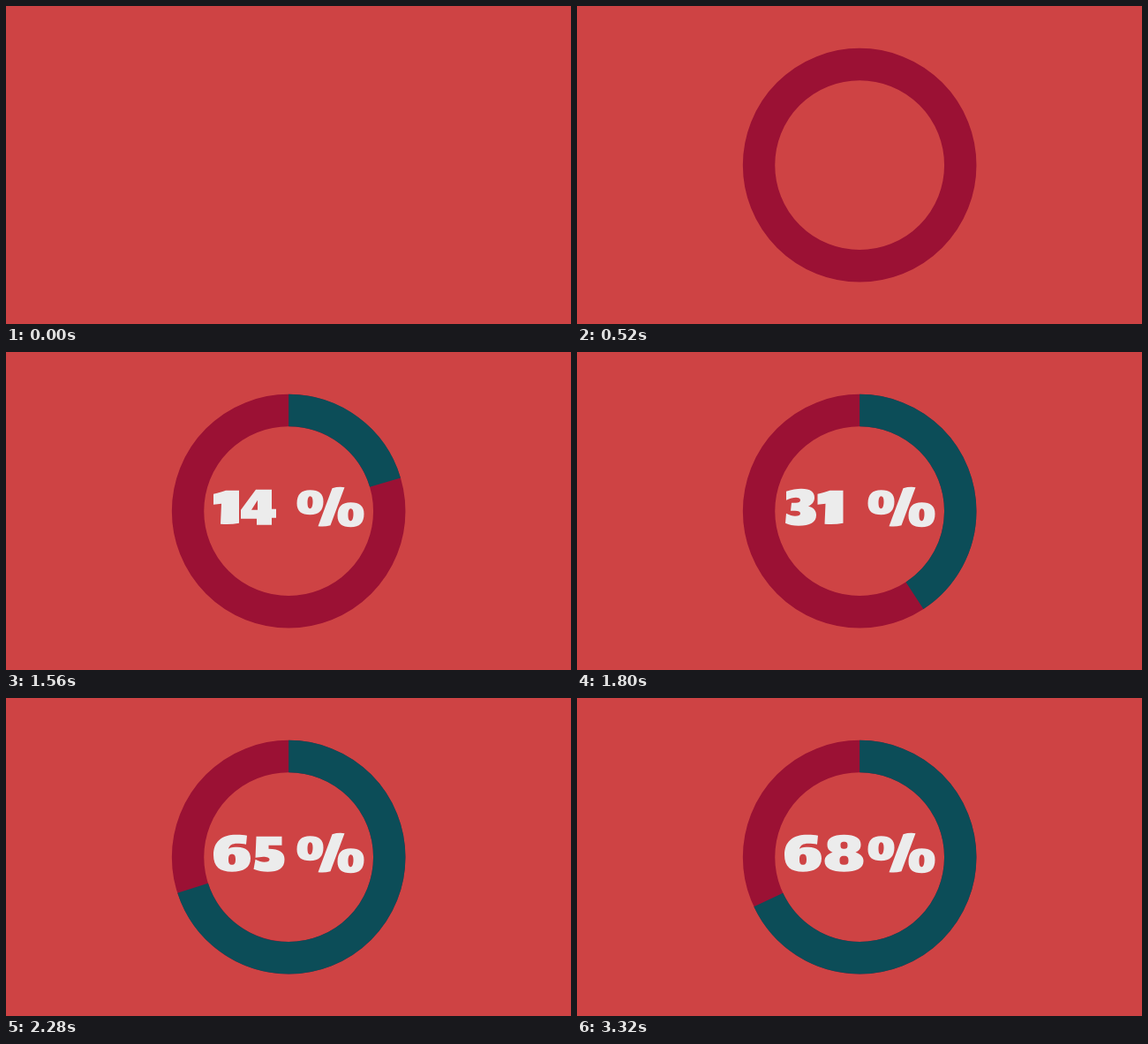
An HTML page with a canvas that plays this animation: 640x360 px, repeating every 4 s.

```html
<!DOCTYPE html>
<html lang="en">
<head>
<meta charset="utf-8">
<title>Percentage ring</title>
<style>
  html, body { margin: 0; width: 100%; height: 100%; overflow: hidden; background: #ce4344; }
  canvas { display: block; }
</style>
</head>
<body>
<canvas id="stage" width="640" height="360" role="img" aria-label="68%"></canvas>
<script>
const ctx = document.getElementById('stage').getContext('2d');

const LOOP = 4000, STEP = 40, PERCENT = 68;
const COLORS = { back: '#ce4344', track: '#9b1134', fill: '#0c4d58', text: '#ececec' };
const RING = { x: 320.15, y: 180.15, radius: 114.1, width: 36.4 };

// Chunky numerals: advance width and outline, top at y = 0
const glyph = (advance, d) => ({ advance, path: new Path2D(d) });
const GLYPHS = {
  0: glyph(43, 'M21 1C36 1 41 7 41 20C41 35 36 42 20 42C6 42 0 36 0 22C0 7 6 1 21 1Z' +
    'M22 9C18 9 16 14 16 22C16 30 17 34 20 34C24 34 26 28 26 20C26 13 25 9 22 9Z'),
  1: glyph(31, 'M0 6C6 5 10 3 14 2L29 2L29 39Q19 41 8 40L9 17L0 18Z'),
  2: glyph(39, 'M1 4C7 1 13 0 19 0C31 0 36 4 36 12C36 20 31 25 22 30L37 29L36 41L1 41L1 31C13 24 18 18 18 14C18 11 16 10 13 10C9 10 5 12 2 15Z'),
  3: glyph(37.5, 'M2 3C8 1 14 0 19 0C30 0 34 4 34 10C34 15 31 18 27 20C33 21 36 25 36 30C36 38 29 42 16 42C10 42 5 41 1 39L2 28C6 30 9 31 12 31C16 31 18 30 18 28C18 26 16 25 12 25L7 25L8 16L13 16C16 16 18 15 18 13C18 11 16 10 13 10C10 10 6 11 2 13Z'),
  4: glyph(42, 'M17 1L35 1L35 23L40 23L40 33L35 33L35 41L18 41L18 34L0 34L0 24ZM19 13L12 24L19 24Z'),
  5: glyph(37, 'M3 2L32 2L32 12L17 12L17 16C29 16 35 20 35 28C35 38 28 42 16 42C10 42 5 41 0 39L2 28C6 30 9 31 12 31C16 31 18 30 18 28C18 26 15 25 11 25L2 26Z'),
  6: glyph(45.5, 'M38 1L37 11C34 10 30 10 27 10C21 10 18 12 17 16C20 14 24 14 27 14C37 14 42 19 42 27C42 37 34 42 21 42C7 42 0 36 0 23C0 8 9 0 26 0C31 0 35 0 38 1Z' +
    'M21 22C18 22 17 24 17 28C17 32 18 34 21 34C24 34 25 32 25 28C25 24 24 22 21 22Z'),
  7: glyph(37, 'M1 2L36 2L36 11C30 19 26 29 25 41L6 41C7 30 12 21 18 14L1 14Z'),
  8: glyph(46, 'M22 0C35 0 41 4 41 11C41 16 39 18 35 20C41 22 44 25 44 30C44 38 36 42 22 42C8 42 0 38 0 30C0 25 3 22 9 20C5 18 3 16 3 11C3 4 9 0 22 0Z' +
    'M22 8C19 8 18 9 18 12C18 15 19 16 22 16C25 16 26 15 26 12C26 9 25 8 22 8ZM22 24C18 24 17 26 17 29C17 33 18 34 22 34C26 34 27 33 27 29C27 26 26 24 22 24Z'),
  9: glyph(45.5, ''),
  '%': glyph(76, 'M40 0Q47 -2 54 -1L38 42Q31 44 24 43Z')
};
const ringlet = new Path2D('M15 2C25 2 30 6 30 15C30 25 25 30 15 30C5 30 0 26 0 17C0 7 5 2 15 2Z' +
  'M15 9C13 9 12 12 12 16C12 21 13 23 15 23C17 23 18 19 18 15C18 11 17 9 15 9Z');
GLYPHS['%'].path.addPath(ringlet);
GLYPHS['%'].path.addPath(ringlet, new DOMMatrix([1, 0, 0, 1, 46, 14]));
GLYPHS[9].path.addPath(GLYPHS[6].path, new DOMMatrix([-1, 0, 0, -1, 42, 42]));

const progress = (t, from, to) => Math.min(1, Math.max(0, (t - from) / (to - from)));

function drawArc(share, color) {
  if (share <= 0) return;
  const top = -Math.PI / 2;
  ctx.beginPath();
  ctx.arc(RING.x, RING.y, RING.radius, top, top + share * 2 * Math.PI);
  ctx.lineWidth = RING.width;
  ctx.strokeStyle = color;
  ctx.stroke();
}

function drawText(text, x, y) {
  for (const char of text) {
    const { advance, path } = GLYPHS[char];
    ctx.save();
    ctx.translate(x, y);
    ctx.fill(path, 'evenodd');
    ctx.restore();
    x += advance;
  }
}

// Linear sweep followed by a decaying spring around the final share
function fillShare(t) {
  const start = 1320, end = 2120;
  const share = PERCENT / 100 * progress(t, start, end);
  if (t <= end) return share;
  const s = (t - end) / 1000;
  const speed = PERCENT / 100 / ((end - start) / 1000);
  return share + speed * 0.05 * Math.sin(4 * Math.PI * s) * Math.exp(-4 * s);
}

function draw(t) {
  ctx.fillStyle = COLORS.back;
  ctx.fillRect(0, 0, 640, 360);
  drawArc(progress(t, 0, 520), COLORS.track);
  drawArc(fillShare(t), COLORS.fill);

  ctx.globalAlpha = progress(t, 1240, 1320);
  ctx.fillStyle = COLORS.text;
  drawText(String(Math.round(PERCENT * progress(t, 1360, 2320))), 235, 154.7);
  drawText('%', 329.5, 154.2);
  ctx.globalAlpha = 1;
}

const begin = performance.now();
function tick() {
  const t = (performance.now() - begin) % LOOP;
  draw(Math.floor((t + 0.5) / STEP) * STEP % LOOP);
  requestAnimationFrame(tick);
}
tick();
</script>
</body>
</html>
```
